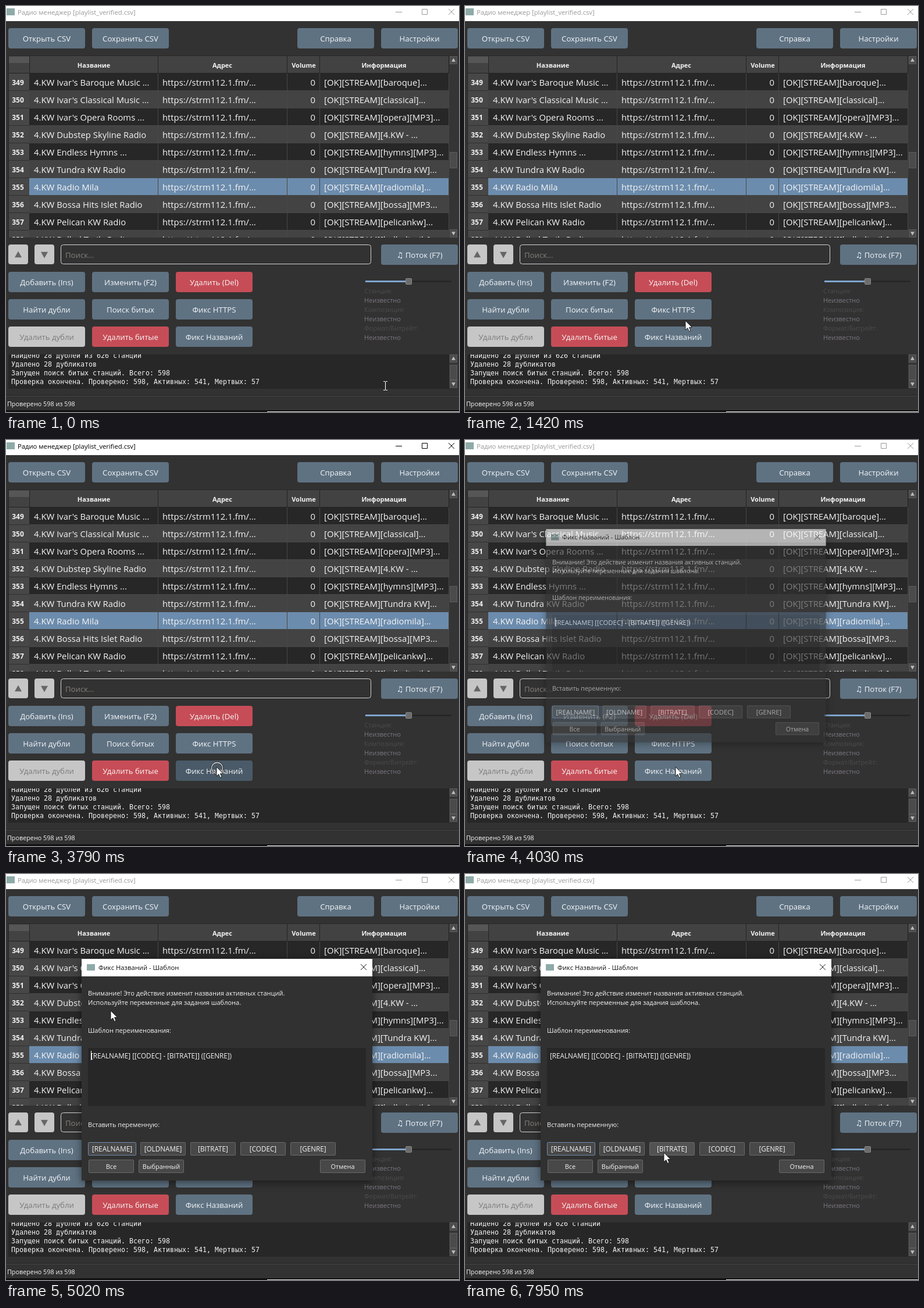
An HTML page for the animation above (8 s loop, 779x698 px).

```html
<!DOCTYPE html>
<html lang="ru">
<head>
<meta charset="utf-8">
<title>Радио менеджер</title>
<style>
  html, body { margin: 0; width: 100%; height: 100%; overflow: hidden; background: #323232; }
  svg { display: block; width: 779px; height: 698px; }
  text { font-family: 'Open Sans', 'Noto Sans', 'DejaVu Sans', sans-serif; fill: #f4f4f4; white-space: pre; }
  .mono { font-family: 'DejaVu Sans Mono', 'Noto Sans Mono', monospace; }
  .shadow { filter: drop-shadow(0 3px 7px rgba(0, 0, 0, .5)); }
</style>
</head>
<body>
<svg id="stage" viewBox="0 0 779 698"></svg>
<script>
const LOOP = 8000;
const rect = (x, y, w, h, fill, extra = '') =>
  `<rect x="${x}" y="${y}" width="${w}" height="${h}" fill="${fill}" ${extra}/>`;
const text = (x, y, str, size, extra = '') =>
  `<text x="${x}" y="${y}" font-size="${size}" ${extra}>${str}</text>`;
const mid = 'text-anchor="middle"';
const path = (d, extra) => `<path d="${d}" ${extra}/>`;
const color = c => ` style="fill:${c}"`;

// Buttons that react to the pointer: { id, x, y, w, h, fill, hover }
const buttons = [];
function hot(x, y, w, h, fill, hover, extra, inDialog) {
  const id = 'b' + buttons.length;
  buttons.push({ id, x, y, w, h, fill, hover, inDialog });
  return rect(x, y, w, h, fill, `id="${id}" ${extra}`);
}

const BLUE = ['#5f7282', '#4a5a68', '#f4f6f8'];
const RED = ['#c64d57', '#ab4049', '#f8f4f4'];
const OFF = ['#c6c6c6', '#c6c6c6', '#7b7b7b'];
const button = (x, y, label, [fill, hover, ink] = BLUE) =>
  hot(x, y, 132, 35, fill, hover, 'rx="4"') +
  text(x + 66, y + 23, label, 13.2, mid + color(ink));

const triangle = (x, y, r, up, fill) => {
  const k = up ? -1 : 1;
  return path(`M${x - r} ${y - k * r * .8}H${x + r}L${x} ${y + k * r}Z`, `fill="${fill}"`);
};

function scrollbar(y, h, thumbY, thumbH) {
  const box = (top, height) => rect(763.5, top + .5, 12, height - 1, '#4b4b4b', 'stroke="#5c5c5c"');
  return rect(762, y, 15, h, '#353535') +
    box(y, 14) + triangle(769.5, y + 7, 3.5, true, '#bcbcbc') +
    box(thumbY, thumbH) +
    box(y + h - 14, 14) + triangle(769.5, y + h - 7, 3.5, false, '#bcbcbc');
}

const cross = (x, y) => path(`M${x - 5} ${y - 5}l10 10m0 -10l-10 10`, 'fill="none" stroke="currentColor"');

function titleBar() {
  return `<g id="bar">` + rect(0, 0, 779, 26, '#fff') + rect(1, 4, 14, 12, '#8eaaa8') +
    text(20, 15, 'Радио менеджер [playlist_verified.csv]', 11.25, 'style="fill:currentColor"') +
    path('M670 10.5h11M715.5 5.5h9v9h-9z', 'fill="none" stroke="currentColor"') +
    cross(766, 10) + '</g>';
}

const rows = [
  ["4.KW Ivar's Baroque Music ...", 'baroque]...'],
  ["4.KW Ivar's Classical Music ...", 'classical]...'],
  ["4.KW Ivar's Opera Rooms ...", 'opera][MP3]...'],
  ['4.KW Dubstep Skyline Radio', '4.KW - ...'],
  ['4.KW Endless Hymns ...', 'hymns][MP3]...'],
  ['4.KW Tundra KW Radio', 'Tundra KW]...'],
  ['4.KW Radio Mila', 'radiomila]...'],
  ['4.KW Bossa Hits Islet Radio', 'bossa][MP3...'],
  ['4.KW Pelican KW Radio', 'pelicankw]...'],
  ['4.KW Ballad Trails Radio', 'balladtrails]...'],
];

function table() {
  const GRID = '#474747', size = 14.85;
  let out = rect(4, 85, 773, 313, '#282828') + rect(5, 86, 757, 29, '#424242') +
    rect(5, 87, 35, 11, '#565656');
  rows.forEach(([name, info], i) => {
    const y = 116 + 30 * i, base = y + 21;
    out += rect(40, y, 722, 29, i === 6 ? '#6c8cad' : i % 2 ? '#434343' : '#272727') +
      rect(40, y + 29, 722, 1, GRID) +
      rect(5, y, 35, 30, '#474747') + rect(5, y + 29, 35, 1, '#303030') +
      text(20.5, y + 20, 349 + i, 12, mid + ' font-weight="700"') +
      text(48, base, name, size) +
      text(269, base, 'https://strm112.1.fm/...', size) +
      text(532, base, 0, size, 'text-anchor="end"') +
      text(547, base, '[OK][STREAM][' + info, size);
  });
  for (const x of [261, 483, 539, 761])
    out += rect(x, 86, 1, 30, '#242424') + rect(x, 116, 1, 282, GRID);
  out += rect(40, 86, 1, 30, '#242424') + rect(5, 115, 757, 1, '#242424');
  [[151, 'Название'], [372, 'Адрес'], [512, 'Volume'], [650, 'Информация']].forEach(([x, s]) =>
    out += text(x, 106, s, 11, mid + ' font-weight="700"'));
  return `<g clip-path="url(#tableClip)">${out}${scrollbar(86, 312, 251, 28)}</g>`;
}

function controls() {
  let out = '';
  for (const [x, up] of [[4, true], [49, false]])
    out += rect(x, 410, 34, 34, '#c6c6c6', 'rx="4"') + triangle(x + 17, 427.5, 6, up, '#666');
  out += rect(94.5, 410.5, 533, 33, '#323232', 'rx="4" stroke="#d5d5d5"') +
    text(102, 433, 'Поиск...', 13.2, color('#85817b')) +
    button(645, 410, '♫ Поток (F7)');
  const grid = [
    ['Добавить (Ins)', BLUE], ['Изменить (F2)', BLUE], ['Удалить (Del)', RED],
    ['Найти дубли', BLUE], ['Поиск битых', BLUE], ['Фикс HTTPS', BLUE],
    ['Удалить дубли', OFF], ['Удалить битые', RED], ['Фикс Названий', BLUE],
  ];
  grid.forEach(([label, kind], i) =>
    out += button(4 + 144 * (i % 3), 457 + 47 * Math.floor(i / 3), label, kind));
  out += rect(692, 472.5, 74, 2, '#222') + rect(618, 472, 70, 3, '#7fa5cf') +
    rect(687.5, 468.5, 10, 10, '#6c6c6c', 'rx="1" stroke="#8b8b8b"');
  ['Станция:', 'Композиция:', 'Формат/Битрейт:'].forEach((label, i) =>
    out += text(616, 494 + 32 * i, label, 11, color('#4c4b4e')) +
      text(616, 510 + 32 * i, 'Неизвестно', 11, color('#7b7680')));
  return out;
}

function logArea() {
  const lines = [
    'Найдено 28 дублей из 626 станций',
    'Удалено 28 дубликатов',
    'Запущен поиск битых станций. Всего: 598',
    'Проверка окончена. Проверено: 598, Активных: 541, Мертвых: 57',
  ];
  return `<g clip-path="url(#logClip)">` + rect(4, 599, 773, 59, '#272727') +
    lines.map((s, i) => text(9, 605 + 15 * i, s, 11.63, 'class="mono"')).join('') +
    scrollbar(599, 58, 617, 26) + '</g>' +
    rect(0, 669, 779, 1, '#222') + rect(0, 670, 779, 1, '#4a4a4a') +
    text(2, 688, 'Проверено 598 из 598', 10.8) +
    rect(0, 695, 779, 3, '#111') + rect(449, 697, 330, 1, '#f0f0f0');
}

function dialog() {
  const small = (x, y, w, label, size, focus) =>
    hot(x + .5, y + .5, w - 1, 22, '#484848', '#525252',
      `rx="1" stroke="${focus ? '#6f8cae' : '#6a6a6a'}"`, true) +
    text(x + w / 2, y + 16, label, size, mid);
  const line = (y, s) => text(141, y, s, 11);
  return `<g id="dialog">` + rect(130, 146, 500, 381, '#313131', 'class="shadow"') +
    rect(130, 146, 500, 30, '#fff') + rect(139, 155, 14, 11, '#8eaaa8') +
    text(159, 165, 'Фикс Названий - Шаблон', 11.25, color('#111')) +
    `<g color="#222">${cross(615, 160)}</g>` +
    line(209, 'Внимание! Это действие изменит названия активных станций.') +
    line(225, 'Используйте переменные для задания шаблона.') +
    line(273, 'Шаблон переименования:') +
    rect(141, 299, 478, 100, '#272727') +
    text(146, 317, '[REALNAME] [[CODEC] - [BITRATE]] ([GENRE])', 11.7) +
    rect(146, 304, 1, 16, '#fff', 'id="caret"') +
    line(435, 'Вставить переменную:') +
    small(141, 461, 83, '[REALNAME]', 11.9, true) +
    ['OLDNAME', 'BITRATE', 'CODEC', 'GENRE'].map((s, i) =>
      small(231 + 86 * i, 461, 78, `[${s}]`, 11.7)).join('') +
    small(142, 491, 78, 'Все', 11) + small(228, 491, 78, 'Выбранный', 11) +
    small(540, 491, 78, 'Отмена', 11) + '</g>';
}

const pointer =
  `<g id="ring" fill="none"><circle cx="363" cy="564" r="9.5" stroke="#222" stroke-width="3"/>` +
  `<circle cx="363" cy="564" r="9.5" stroke="#eee" stroke-width="1.3"/></g>` +
  path('M0 0V16L3.8 12.6L6.4 18.4L9 17.3L6.5 11.6H11.4Z', 'id="arrow" fill="#fff" stroke="#111" stroke-width=".9"') +
  path('M-3.5-7.5h3M.5-7.5h3M0-7V7M-3.5 7.5h3M.5 7.5h3', 'id="beam" fill="none" stroke="#fff" stroke-width="1.1"');

document.getElementById('stage').innerHTML =
  `<clipPath id="tableClip">${rect(4, 85, 773, 313, '#000')}</clipPath>` +
  `<clipPath id="logClip">${rect(4, 599, 773, 59, '#000')}</clipPath>` +
  rect(0, 0, 779, 698, '#323232') + titleBar() +
  button(4, 38, 'Открыть CSV') + button(148, 38, 'Сохранить CSV') +
  button(501, 38, 'Справка') + button(645, 38, 'Настройки') +
  table() + controls() + logArea() + dialog() + pointer;

const el = id => document.getElementById(id);
const show = (id, on) => el(id).setAttribute('visibility', on ? 'visible' : 'hidden');

// Pointer path: time, x, y
const track = [
  [0, 652, 653], [400, 600, 645], [810, 534, 646], [1100, 450, 600], [1420, 379, 541],
  [1570, 366, 527], [1940, 366, 527], [2060, 362, 532], [2180, 362, 532], [2330, 362, 562],
  [4750, 362, 562], [5020, 180, 235], [5160, 178, 199], [5560, 208, 287], [6220, 223, 318],
  [6750, 223, 318], [7180, 318, 385], [7560, 407, 447], [7600, 407, 447], [7950, 342, 479],
  [LOOP, 342, 479],
];

function pointerAt(t) {
  const i = track.findIndex(k => k[0] > t);
  const [t0, x0, y0] = track[i - 1], [t1, x1, y1] = track[i];
  const k = (t - t0) / (t1 - t0);
  return [Math.round(x0 + (x1 - x0) * k), Math.round(y0 + (y1 - y0) * k)];
}

const inside = (px, py, b) => px >= b.x && px < b.x + b.w && py >= b.y && py < b.y + b.h;
const logBox = { x: 4, y: 599, w: 758, h: 59 };
const inputBox = { x: 141, y: 299, w: 478, h: 100 };

function draw() {
  const t = performance.now() % LOOP;
  const open = t >= 3940, clicked = t >= 3790 && !open;
  const [x, y] = pointerAt(t);

  el('bar').setAttribute('color', clicked ? '#000' : '#999');
  show('ring', clicked);

  // The dialog grows and fades in with an ease-out
  const rest = 1 - Math.min(1, Math.max(0, (t - 3920) / 300));
  const scale = 1 - .15 * rest ** 3;
  show('dialog', open);
  el('dialog').setAttribute('opacity', 1 - rest ** 2);
  el('dialog').setAttribute('transform', `translate(380 336) scale(${scale}) translate(-380 -336)`);
  show('caret', open && Math.floor((t - 3955) / 515) % 2 === 0);

  for (const b of buttons) {
    const over = !!b.inDialog === open && inside(x, y, b);
    el(b.id).setAttribute('fill', over ? b.hover : b.fill);
  }

  const typing = inside(x, y, open ? inputBox : logBox);
  show('arrow', !typing);
  show('beam', typing);
  el('arrow').setAttribute('transform', `translate(${x} ${y})`);
  el('beam').setAttribute('transform', `translate(${x + .5} ${y})`);
  requestAnimationFrame(draw);
}
draw();
</script>
</body>
</html>
```
